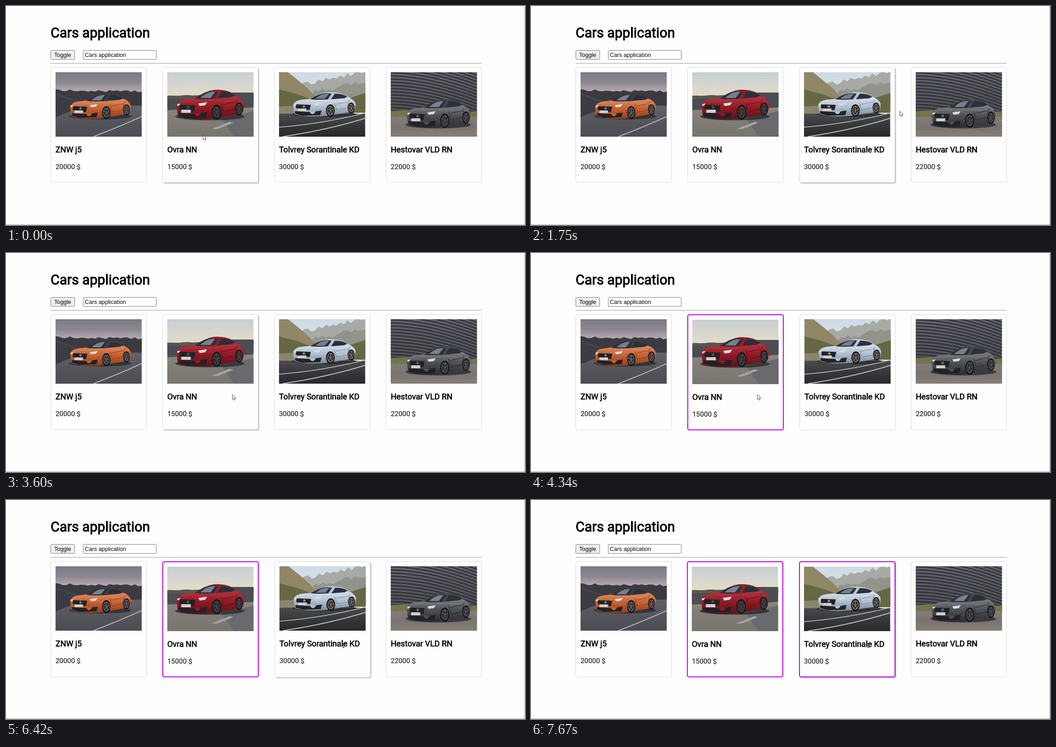
Recreate the animation shown at these times as an HTML page with a canvas. Size 1152 px wide and 486 px high, loop 8000 ms.

```html
<!DOCTYPE html>
<html lang="en">
<head>
<meta charset="utf-8">
<title>Cars application</title>
<style>
html, body { margin: 0; width: 100%; height: 100%; overflow: hidden; background: #fefefe; }
canvas { display: block; width: 1152px; height: 486px; }
</style>
</head>
<body>
<canvas id="stage" width="1152" height="486"></canvas>
<script>
const ctx = document.getElementById('stage').getContext('2d');
const LOOP = 8000, TICK = 120, FADE = 270, SLICE = 30;
const LEFT = 99, ROW = 957, TOP = 136;
const PHOTO_W = 191.5, PHOTO_H = 143;

// pointer trips: start time, number of jumps, x, y
const START = [437, 286];
const TRIPS = [
  [150, 3, 516, 187], [540, 3, 683, 241], [1480, 1, 722, 236],
  [1630, 2, 818, 233], [1870, 3, 889, 238], [2790, 1, 822, 237],
  [2940, 2, 561, 290], [3210, 3, 502, 314], [4980, 1, 536, 313],
  [5130, 4, 699, 346], [6300, 2, 749, 323]
];
const BEAM_FROM = 6420;

const cars = [
  { name: 'ZNW j5', price: 20000, scene: hills, box: [31, 47, 136, 59],
    paint: ['#dc8a62', '#c6602f', '#8f3d20'], roof: '#3f3b42', rim: '#77787d' },
  { name: 'Ovra NN', price: 15000, scene: terrace, box: [19, 39, 151, 69], pick: 4340,
    paint: ['#b5333f', '#8f1925', '#5c121b'], roof: '#8f1f2a', rim: '#4d4b50' },
  { name: 'Tolvrey Sorantinale KD', price: 30000, scene: mountains, box: [30, 44, 140, 57], pick: 7380,
    paint: ['#d3deea', '#b3c0cf', '#76869a'], roof: '#b9c5d2', rim: '#95897d' },
  { name: 'Hestovar VLD RN', price: 22000, scene: wall, box: [34, 60, 143, 66],
    paint: ['#7d7e81', '#4c4d50', '#2c2d30'], roof: '#454649', rim: '#606165' }
];

const clamp = v => Math.max(0, Math.min(1, v));

function shape(fill, d) {
  ctx.fillStyle = fill;
  ctx.fill(new Path2D(d));
}

function line(color, width, d) {
  ctx.strokeStyle = color;
  ctx.lineWidth = width;
  ctx.stroke(new Path2D(d));
}

function rect(x, y, w, h, fill) {
  ctx.fillStyle = fill;
  ctx.fillRect(x, y, w, h);
}

function oval(fill, x, y, rx, ry = rx) {
  ctx.fillStyle = fill;
  ctx.beginPath();
  ctx.ellipse(x, y, rx, ry, 0, 0, 7);
  ctx.fill();
}

function gradient(y0, y1, colors) {
  const g = ctx.createLinearGradient(0, y0, 0, y1);
  colors.forEach((c, i) => g.addColorStop(i / (colors.length - 1), c));
  return g;
}

function band(y0, y1, ...colors) {
  rect(0, y0, PHOTO_W, y1 - y0, gradient(y0, y1, colors));
}

// rough skyline from the left height to the right height
function ridge(seed, yLeft, yRight, rough, bottom, fill) {
  let d = `M0 ${bottom}`;
  for (let x = 0; x <= 192; x += 8) {
    seed = (seed * 16807) % 2147483647;
    d += `L${x} ${yLeft + (yRight - yLeft) * x / 192 + (seed / 2147483647 - .5) * rough}`;
  }
  shape(fill, d + `L192 ${bottom}Z`);
}

function hills() {
  band(0, 45, '#7b7b84', '#8b8790', '#b9aeb3');
  ridge(17, 40, 43, 5, 76, '#3a3a40');
  shape('#45454b', 'M0 46L45 62 48 90 0 104Z');
  band(74, PHOTO_H, '#62636a', '#54565c', '#4b4d53');
  shape('#3b3b41', 'M0 50L52 68 40 84 0 100Z');
  line('#b8b8bc', 2, 'M84 143Q142 121 192 98');
}

function terrace() {
  band(0, 54, '#c7ced2', '#d5d6d1', '#e3dcc5');
  band(52, PHOTO_H, '#98928a', '#827e77', '#787571');
  ridge(23, 53, 47, 2, 60, '#555850');
  shape('#4b4d52', 'M0 59H50V82L0 84ZM143 45H192V78L155 80Z');
  shape('#686a6e', 'M120 104L192 86V143H148Z');
  shape('#a5a5a3', 'M98 126L138 110 147 112 111 126Z');
}

function mountains() {
  band(0, 80, '#cfdae5', '#dfe6ea');
  ridge(31, 38, -2, 9, 85, '#a8aaa6');
  ridge(47, 62, 20, 12, 85, '#92948b');
  shape('#8f8766', 'M0 0H20L45 20 66 38 92 68 0 85Z');
  shape('#666744', 'M0 38L38 48 90 66V80H0ZM148 60L192 46V90H150Z');
  shape('#8a846f', 'M0 76L40 74 75 90 0 106Z');
  band(92, PHOTO_H, '#4a4b4b', '#36383b', '#28292c');
  line('#cfcfcd', 1.5, 'M0 122Q100 114 192 90');
  line('#c2c3c3', 2, 'M8 143Q108 128 192 102');
}

function wall() {
  band(0, 96, '#5d5f66', '#4b4d54', '#3d3f44');
  for (let y = -56; y < 96; y += 7) {
    line('#34363c', 3, `M0 ${y + 15}Q85 ${y + 16} 192 ${y + 56}`);
    line('#73757b', 1, `M0 ${y + 12}Q85 ${y + 13} 192 ${y + 53}`);
  }
  shape('#73754d', 'M0 86L70 83 192 88V104H0Z');
  band(99, PHOTO_H, '#827d79', '#78736f', '#858079');
}

function wheel(x, y, rx, ry, rim) {
  oval('#18181b', x, y, rx, ry);
  oval(rim, x, y, rx * .74, ry * .76);
  oval('#29292d', x, y, rx * .62, ry * .64);
  for (let a = -1.5; a < 4.5; a += Math.PI * .4) {
    line(rim, .9, `M${x} ${y}L${x + rx * .65 * Math.cos(a)} ${y + ry * .7 * Math.sin(a)}`);
  }
}

// three-quarter view in a 100 by 50 box
function vehicle({ box: [x, y, w, h], paint, roof, rim }) {
  ctx.save();
  ctx.translate(x, y);
  ctx.scale(w / 100, h / 50);
  oval('#2b2b2fcc', 50, 43, 51, 6);
  shape(roof, 'M28 15Q42 2 56 0Q76-1 87 8L95 16 60 20Z');
  shape(gradient(10, 48, paint), 'M1 25Q3 17 14 15L30 13 56 15 88 10Q98 14 100 23Q100 35 97 38L72 43 50 47Q20 50 3 43Z');
  shape('#2b303a', 'M28 14Q41 3 54 2L62 3 56 14Q42 16 28 14ZM61 14L67 3Q80 3 87 9L82 12Z');
  shape('#75828e', 'M36 13Q44 4 54 3L58 3 51 13Z');
  line(paint[0], .8, 'M6 20Q20 16 32 18L54 17 95 19');
  line(paint[2], .9, 'M66 21L70 35 87 31 90 15M68 24L88 19');
  shape('#222226', 'M6 24L29 25 27 35 9 34 5 30ZM4 37L28 39 46 36 44 45 16 46 4 42Z');
  shape(paint[1], 'M27 37L37 38 33 43 29 42Z');
  shape('#d3dce1', 'M33 22L46 20 43 25 35 26ZM2 23L7 22 5 25 2 26Z');
  oval(rim, 18, 28, 2, 2.4);
  wheel(60, 36, 7, 12, rim);
  wheel(93, 31, 5.5, 10.5, rim);
  rect(8, 32, 14, 5, '#d0d2d2');
  ctx.restore();
}

function text(str, x, y, size, { bold = 0, family = 'Roboto' } = {}) {
  ctx.font = `${size}px ${family}, sans-serif`;
  ctx.fillStyle = ctx.strokeStyle = '#000';
  ctx.fillText(str, x, y);
  if (bold) {
    ctx.lineWidth = bold;
    ctx.lineJoin = 'round';
    ctx.strokeText(str, x, y);
  }
}

function frame(x, y, w, h, r, fill, stroke, width = 1) {
  ctx.beginPath();
  ctx.roundRect(x + width / 2, y + width / 2, w - width, h - width, r);
  ctx.fillStyle = fill;
  ctx.fill();
  ctx.strokeStyle = stroke;
  ctx.lineWidth = width;
  ctx.stroke();
}

function header() {
  rect(0, 0, 1152, 486, '#fefefe');
  text('Cars application', LEFT, 70, 30.6, { bold: 1 });
  frame(LEFT, 98, 54, 21, 2, '#efefef', '#767676');
  frame(171, 98, 163, 21, 1, '#fff', '#767676');
  const form = { family: 'Arial, "Liberation Sans"' };
  text('Toggle', 107, 113, 12.76, form);
  text('Cars application', 175, 113, 12.76, form);
  rect(LEFT, 126.5, ROW, 1.5, '#b7b7bd');
  rect(1151, 0, 1, 486, '#a5a5a5');
  rect(0, 485, 1152, 1, '#a5a5a5');
}

function card(car, x, picked, tall, glow) {
  const w = picked ? 214 : 213, h = tall ? 257.5 : 256;
  const left = x + 11, dy = picked ? 1 : 0;
  ctx.save();
  ctx.shadowColor = `rgba(0,0,0,${.24 * glow})`;
  ctx.shadowOffsetX = ctx.shadowOffsetY = 2;
  ctx.shadowBlur = 1.5;
  ctx.beginPath();
  ctx.roundRect(x, TOP, w, h, 4);
  ctx.fillStyle = '#fefefe';
  ctx.fill();
  ctx.restore();
  frame(x, TOP, w, h, 3.5, '#fefefe', picked ? '#b900e0' : '#d9d9d9', picked ? 2 : 1);

  ctx.save();
  ctx.translate(left, 147 + dy);
  ctx.beginPath();
  ctx.rect(0, 0, PHOTO_W, PHOTO_H);
  ctx.clip();
  car.scene();
  vehicle(car);
  ctx.restore();
  text(car.name, left, 325 + dy, 17.9, { bold: .65 });
  text(`${car.price} $`, left, 362 + dy, 15.3);
}

function arrow(x, y) {
  ctx.save();
  ctx.translate(x + .5, y + .5);
  const d = 'M0 0V10.5L2.5 8.3 4 12 6 11.1 4.4 7.5H7.8Z';
  shape('#fff', d);
  line('#222', .8, d);
  ctx.restore();
}

function beam(x, y) {
  line('#222', 1, `M${x - 2.5} ${y - 4.5}h5M${x} ${y - 4}v8M${x - 2.5} ${y + 4.5}h5`);
}

function pointerAt(t) {
  let [x, y] = START;
  for (const [at, jumps, toX, toY] of TRIPS) {
    if (t < at) break;
    const k = Math.min(1, (Math.floor((t - at) / TICK) + 1) / jumps);
    x += (toX - x) * k;
    y += (toY - y) * k;
  }
  return [x, y];
}

const isPicked = (car, t) => t >= car.pick;

// cards spread over the row with equal gaps; a thicker border takes more room
function layout(t) {
  const widths = cars.map(car => isPicked(car, t) ? 214.5 : 213);
  const gap = (ROW - widths.reduce((a, b) => a + b)) / (cars.length - 1);
  let x = LEFT;
  return widths.map(w => {
    const left = Math.round(x);
    x += w + gap;
    return left;
  });
}

function hovered(i, t) {
  const [x, y] = pointerAt(t);
  const left = LEFT + i * 248;
  return x >= left && x < left + 213 && y > TOP && y < 392;
}

// shadow strength: fades in while hovered, out afterwards, restarts on a click
function glowOf(i, t) {
  const picked = isPicked(cars[i], t);
  let level = !picked && hovered(i, 0) ? 1 : 0;
  for (let s = picked ? cars[i].pick : 0; s + SLICE <= t; s += SLICE) {
    level = clamp(level + (hovered(i, s) ? 1 : -1) * SLICE / FADE);
  }
  return level;
}

function draw() {
  const t = performance.now() % LOOP;
  const lefts = layout(t);
  const tall = cars.some(car => isPicked(car, t));
  header();
  cars.forEach((car, i) => card(car, lefts[i], isPicked(car, t), tall, glowOf(i, t)));
  (t >= BEAM_FROM ? beam : arrow)(...pointerAt(t));
  requestAnimationFrame(draw);
}
draw();
</script>
</body>
</html>
```
